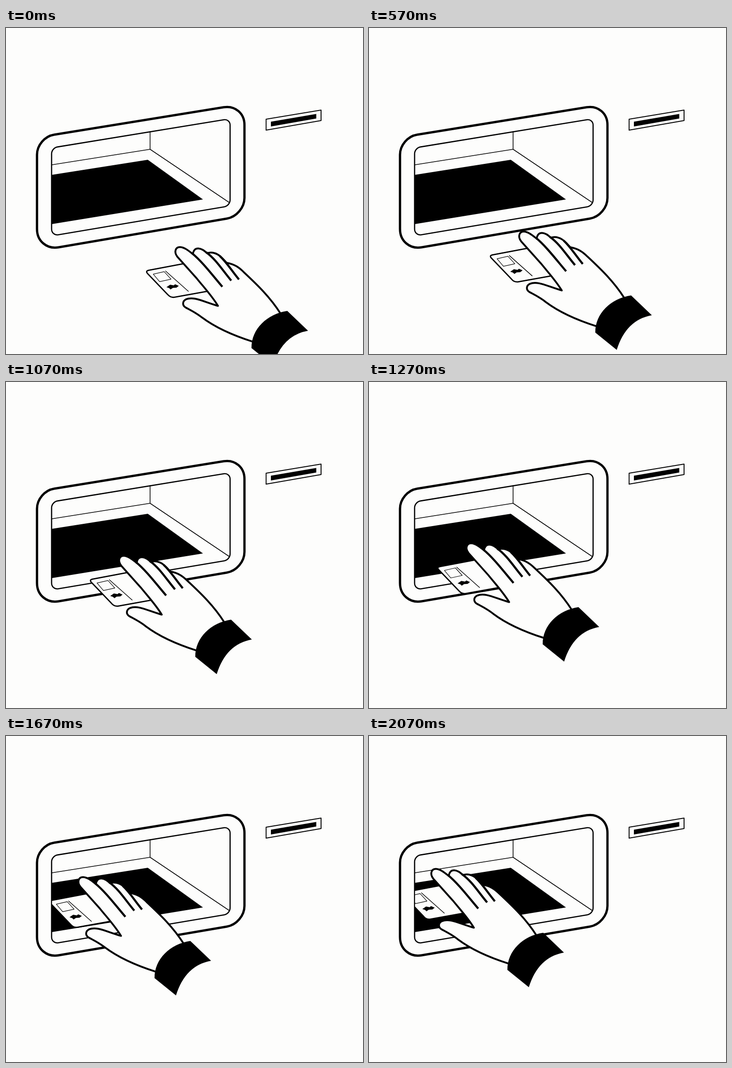
These frames come from a looping animation (783x715 px, 2.48 s). An HTML page with a canvas:

```html
<!DOCTYPE html>
<html lang="en">
<head>
<meta charset="utf-8">
<title>Card into tray</title>
<style>
html, body { margin: 0; width: 100%; height: 100%; overflow: hidden; background: #fdfdfc; }
canvas { display: block; }
</style>
</head>
<body>
<canvas id="stage" width="783" height="715"></canvas>
<script>
const ctx = document.getElementById('stage').getContext('2d');
const PAPER = '#fdfdfc', INK = '#000';
const LOOP = 2480, LAST = 62, SHIFT_X = -235, SHIFT_Y = -189;

const floor = new Path2D('M101 322L311 289L432 376L101 430Z');
const room = new Path2D('M316 227V266L101 300M316 266L490 383');
const slot = new Path2D('M570.5 200L691 180V203L570.5 224Z');
const slit = new Path2D('M581 205.5L680.5 188.5V198.5L581 216Z');
const rim = roundQuad([[68, 240], [523, 166.5], [523, 411.5], [68, 489]], [38, 46, 39, 48]);
const hole = roundQuad([[100, 263], [491.5, 199], [491.5, 390], [100, 456]], [13, 14, 13, 15]);

const card = new Path2D('M395 516L313 531.5Q306 533 310 538L355 585Q361 592 370 590.5L445 577Z');
const photo = new Path2D('M323 540L347 534.5L362 551L337 556.5Z');
const divider = new Path2D('M350 533L400 577.5');
const emblem = new Path2D('M352 568.5L360 563L368 564.5L371 562L379 565.5L374 569.5L366 570L361 573.5L358 570.5Z');

const hand = new Path2D(
  'M541 688C500 675 462 659 430 635C416 624 405 619 394 613C386 608 387 599 395 595' +
  'C412 588 432 600 465 609.5C452 588 436 571 419 550L376 502C367 490 373 480 382 480.5' +
  'C392 481 401 489 410 496C411 487 416 483 422 483.5C430 484 436 489 441 494' +
  'C452 490 464 495 470 501C476 506 480 511 484 515C501 518 511 525 521 535' +
  'C552 564 579 590 602 626');
const creases = new Path2D(
  'M408 494C430 512 452 541 474.5 567.5M439 492C460 507 474 530 494 554M469 500C485 515 494 531 511 551.5');
const cuff = new Path2D(
  'M538.5 702C538 660 573 627 617 620.5L662.5 664Q606 674 585.5 740Z');

// Closed four-sided path whose corners are rounded along its own edges
function roundQuad(pts, radii) {
  const path = new Path2D();
  const toward = (a, b, d) => {
    const len = Math.hypot(b[0] - a[0], b[1] - a[1]);
    return [a[0] + (b[0] - a[0]) * d / len, a[1] + (b[1] - a[1]) * d / len];
  };
  pts.forEach((p, i) => {
    const prev = pts[(i + 3) % 4], next = pts[(i + 1) % 4], r = radii[i];
    const start = toward(p, prev, r);
    if (i) path.lineTo(...start); else path.moveTo(...start);
    path.bezierCurveTo(...toward(p, prev, r * 0.45), ...toward(p, next, r * 0.45), ...toward(p, next, r));
  });
  path.closePath();
  return path;
}

function fill(path, color) {
  ctx.fillStyle = color;
  ctx.fill(path);
}

function line(path, width) {
  ctx.lineWidth = width;
  ctx.stroke(path);
}

function drawMachine() {
  fill(floor, INK);
  line(room, 1.6);
  line(rim, 5);
  line(hole, 2.6);
  line(slot, 2);
  fill(slit, INK);
}

function drawCard(x, y) {
  ctx.save();
  ctx.beginPath();
  ctx.rect(101, 0, 682, 715);
  ctx.clip();
  ctx.translate(x, y);
  fill(card, PAPER);
  line(card, 2.8);
  line(photo, 1.2);
  line(divider, 1.5);
  fill(emblem, INK);
  ctx.restore();
}

function drawHand(x, y) {
  ctx.save();
  ctx.translate(x, y);
  fill(hand, PAPER);
  line(hand, 4);
  ctx.lineCap = 'butt';
  line(creases, 4.6);
  fill(cuff, INK);
  ctx.restore();
}

// Thirty poses a second, each held on a 10 ms grid, then a rest
function progress(ms) {
  const step = Math.min(LAST, Math.floor((Math.floor(ms / 10) * 10 + 5) * 0.03));
  return (1 - Math.cos(Math.PI * (step + 0.6) / 63.2)) / 2;
}

function draw() {
  const p = progress(performance.now() % LOOP);
  const x = SHIFT_X * p, y = SHIFT_Y * p;
  ctx.fillStyle = PAPER;
  ctx.fillRect(0, 0, 783, 715);
  ctx.strokeStyle = INK;
  ctx.lineJoin = 'round';
  ctx.lineCap = 'round';
  drawMachine();
  drawCard(x, y);
  drawHand(x, y);
  requestAnimationFrame(draw);
}
draw();
</script>
</body>
</html>
```
